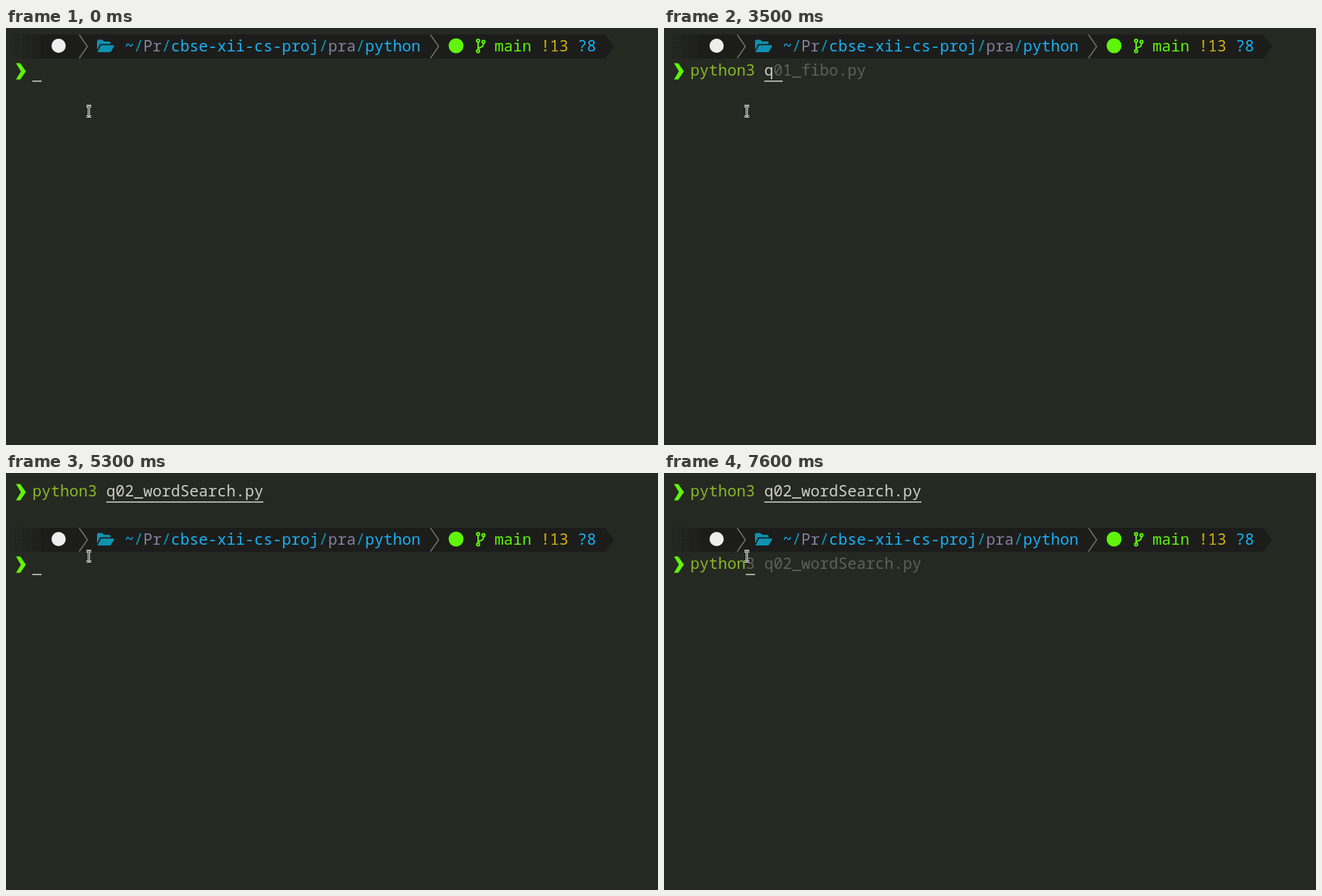
Recreate the animation shown at these times as an HTML page. Size 917 px wide and 587 px high, loop 8 s.

```html
<!DOCTYPE html>
<html lang="en">
<head>
<meta charset="utf-8">
<title>Terminal session</title>
<style>
  html, body { margin: 0; width: 100%; height: 100%; overflow: hidden; background: #262822; }
  svg { display: block; width: 917px; height: 587px; }
  text {
    font: 21.667px "Noto Sans Mono", "DejaVu Sans Mono", monospace;
    font-variant-ligatures: none;
    white-space: pre;
  }
  .path { fill: #1bb1f3; }
  .slash { fill: #0f98b8; }
  .short { fill: #8580a0; }
  .git { fill: #5ff50a; }
  .dirty { fill: #d0b010; }
  .cmd { fill: #87b829; }
  .bad { fill: #d0125c; font-weight: 700; }
  .arg, .rule { fill: #cdcdc8; }
  .ghost { fill: #5f605b; }
  .chevron { fill: none; stroke: #777; stroke-width: 1.4; }
</style>
</head>
<body>
<svg viewBox="0 0 917 587">
  <defs>
    <pattern id="light" width="3" height="3" patternUnits="userSpaceOnUse"><rect width="1.5" height="1.5" fill="#1c1d1b"/></pattern>
    <pattern id="medium" width="3" height="3" patternUnits="userSpaceOnUse"><rect width="2.1" height="2.1" fill="#1c1d1b"/></pattern>
    <pattern id="dark" width="3" height="3" patternUnits="userSpaceOnUse"><rect width="2.6" height="2.6" fill="#1c1d1b"/></pattern>
  </defs>

  <g id="bar">
    <rect x="11" y="9" width="13" height="34" fill="url(#light)"/>
    <rect x="24" y="9" width="13" height="34" fill="url(#medium)"/>
    <rect x="37" y="9" width="13" height="34" fill="url(#dark)"/>
    <path d="M50 9H843L855.500 26L843 43H50Z" fill="#1c1d1b"/>
    <circle cx="74" cy="25" r="10" fill="#eee"/>
    <path class="chevron" d="M103 9.500L114.500 26L103 42.500M597 9.500L608.500 26L597 42.500"/>
    <path fill="#0e92b0" d="M128 31V18.500Q128 16.500 130 16.500H135.500L138 19H145Q147 19 147 21V22.500H134Q132.500 22.500 131.700 23.800Z
      M128.500 34L133 25.500Q133.700 24.300 135 24.300H151Q152.700 24.300 152 25.700L147.800 33Q147.200 34 146 34Z"/>
    <circle cx="633" cy="25" r="10.500" class="git"/>
    <g fill="none" stroke="#5ff50a" stroke-width="2">
      <path d="M664 20V31M671.500 22Q671.500 26 668 27Q664 28 664 31"/>
      <circle cx="664" cy="18" r="2"/>
      <circle cx="664" cy="32.500" r="2"/>
      <circle cx="671.500" cy="19.500" r="2"/>
    </g>
  </g>

  <g id="lines"></g>

  <g fill="none">
    <path id="beam" d="M113 110H115.500L116.500 111L117.500 110H120M116.500 111V123M113 124.500H115.500L116.500 123.500L117.500 124.500H120" stroke="#f4f4f4" stroke-width="3"/>
    <use href="#beam"/>
    <path d="M113 110H115.500L116.500 111L117.500 110H120M116.500 111V123M113 124.500H115.500L116.500 123.500L117.500 124.500H120" stroke="#111"/>
  </g>
</svg>

<script>
const CELL = 13, LEFT = 11, ROW = 34, LOOP = 8000;
const bar = document.getElementById('bar');
const lines = document.getElementById('lines');
const colX = col => LEFT + col * CELL;

function add(parent, tag, attrs, content = '') {
  const el = document.createElementNS('http://www.w3.org/2000/svg', tag);
  for (const key in attrs) el.setAttribute(key, attrs[key]);
  el.textContent = content;
  parent.append(el);
}

function write(parent, col, row, kind, string) {
  if (string) add(parent, 'text', { x: colX(col), y: 33 + row * ROW, class: kind }, string);
}

function rule(col, row, cells) {
  add(lines, 'rect', { x: colX(col), y: 40 + row * ROW, width: cells * CELL, height: 1.6, class: 'rule' });
}

function command(row, typed, hint, cursor) {
  const y = 27 + row * ROW;
  add(lines, 'path', { d: `M14 ${y - 11.5}H20L28 ${y}L20 ${y + 11.5}H14L21 ${y}Z`, class: 'git' });
  const [program, arg = ''] = typed.split(' ');
  write(lines, 2, row, /^python3?$/.test(program) ? 'cmd' : 'bad', program);
  write(lines, 3 + program.length, row, 'arg', arg);
  if (arg) rule(3 + program.length, row, arg.length);
  write(lines, 2 + typed.length, row, 'ghost', hint.slice(typed.length));
  if (cursor) rule(2 + typed.length, row, 1);
}

// Status bar text
let col = 12;
for (const part of '~/Pr/cbse-xii-cs-proj/pra/python'.split(/(\/)/)) {
  write(bar, col, 0, part === '/' ? 'slash' : /^Pr|^pra/.test(part) ? 'short' : 'path', part);
  col += part.length;
}
write(bar, 52, 0, 'git', 'main');
write(bar, 57, 0, 'dirty', ' !13'.trim());
write(bar, 61, 0, 'path', '?8');

const FIBO_I = 'python3 -i q01_fibo.py';
const FIBO = 'python3 q01_fibo.py';
const SEARCH = 'python3 q02_wordSearch.py';
const RUN = 5200, DONE = 5300;

// start, typed text, suggestion, cursor hidden
const steps = [
  [0, '', ''],
  [1200, 'p', FIBO_I],
  [1500, 'py', FIBO_I],
  [1600, 'pyth', FIBO_I],
  [1700, 'pytho', FIBO_I],
  [1800, 'python', FIBO_I],
  [2400, 'python', FIBO_I, true],
  [2600, 'python3', FIBO_I],
  [3000, 'python3 ', FIBO_I],
  [3500, 'python3 q', FIBO],
  [4000, 'python3 q0', FIBO],
  [4300, 'python3 q02', ''],
  [4700, SEARCH + ' ', ''],
  [RUN, '', ''],
  [DONE, '', ''],
  [5900, '', '', true],
  [6600, '', ''],
  [7100, 'p', SEARCH],
  [7300, 'py', SEARCH],
  [7400, 'pyth', SEARCH],
  [7500, 'pytho', SEARCH],
  [7600, 'python', SEARCH],
];

function draw([start, typed, hint, hidden]) {
  lines.replaceChildren();
  bar.style.display = start === RUN ? 'none' : '';
  bar.setAttribute('transform', `translate(0 ${start >= DONE ? 2 * ROW : 0})`);
  if (start >= RUN) command(0, SEARCH, '', false);
  if (start === RUN) rule(0, 1, 1);
  else command(start >= DONE ? 3 : 1, typed, hint, !hidden);
}

let shown;
function tick() {
  const t = performance.now() % LOOP;
  const step = steps.findLast(s => s[0] <= t);
  if (step !== shown) draw(shown = step);
  requestAnimationFrame(tick);
}
tick();
</script>
</body>
</html>
```
